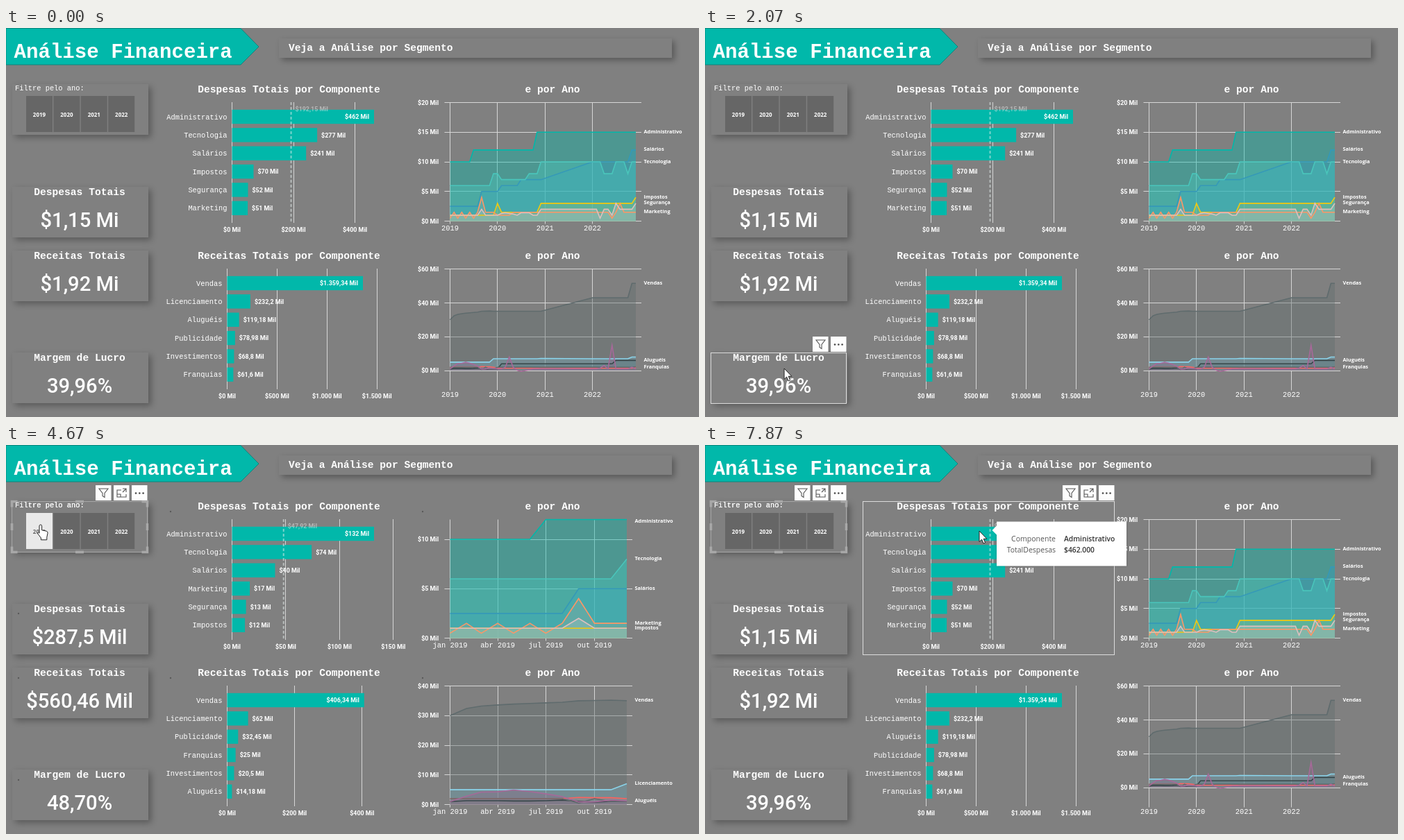
These frames come from a looping animation (998x561 px, 8000 ms). An HTML page with a canvas:

```html
<!DOCTYPE html>
<html lang="pt-BR">
<head>
<meta charset="utf-8">
<title>Análise Financeira</title>
<style>
html, body { margin: 0; width: 100%; height: 100%; overflow: hidden; background: #808080; }
canvas { display: block; width: 998px; height: 561px; }
</style>
</head>
<body>
<canvas id="stage" width="998" height="561"></canvas>
<script>
const ctx = document.getElementById('stage').getContext('2d');
const LOOP = 8000, STEP = 200 / 3;
const TEAL = '#01b8aa', GRAY = '#808080', WHITE = '#fff', GRID = '#d6d6d6';
const MONO = '"Liberation Mono", "Courier New", monospace';
const DIN = 'Roboto, Arial, sans-serif';
const UI = '"Open Sans", "Noto Sans", sans-serif';
const BOLD = 'bold 14.6px ' + MONO, LABEL = '10.4px ' + MONO;
const VALUE = 'bold 8.9px ' + DIN, TAG = 'bold 7.4px ' + UI;

// Monthly values for 2019, 2020 and 2022; "5x3" repeats 5 three times.
const unpack = s => s.split(' ').flatMap(p => {
  const [v, n] = p.split('x');
  return Array(+(n || 1)).fill(+v);
});
const series = rows => rows.map(([name, color, s]) => ({ name, color, data: unpack(s) }));
const expenses = series([
  ['Administrativo', TEAL, '10x6 12x16 15x14'],
  ['Impostos', '#f2c80f', '1x12 3 1.5x10 3x12 4'],
  ['Marketing', '#fe9666', '.5 1.5 .5 1.5 .5 1.5 .5 1.5 4 1.5x3 1x4 1.5x13 .5 1.5 3 1.5x4'],
  ['Salários', '#3599b8', '2.5x8 5x5 6x5 7x6 10x10 12x2'],
  ['Segurança', '#dfbfbf', '1x8 2 1x4 1.3 1.4 1.3 1.2 1 1.4x3 1x2 2x3 .5 2x2 1 3 2x4 3'],
  ['Tecnologia', '#4ac5bb', '6x11 8x2 7x7 8x3 10x4 8x3 10x3 8 10x2']
]);
const revenues = series([
  ['Aluguéis', '#374649', '1 1.3x3 1.2x2 1.3 1.5 1.1 .8 1.1 1.08 1 4x17 6x6'],
  ['Franquias', '#fd625e', '2x8 2.4 2.3x2 2 1.5x11 1.8 1.5x11 1.8'],
  ['Investimentos', '#5f6b6d', '2x8 .5 2 1x2 2x23 2.3'],
  ['Licenciamento', '#8ad4eb', '5x11 7x12 7.2 7x10 8x2'],
  ['Publicidade', '#a66999', '1 2.8 4.2 4.3 4.9 4.4 3.6 2.7 .9x2 1.5 1.246 1x2 2 8 2 .2 -.5 0 .5 1x5 1.5 3 1 15 1x4 2 .83'],
  ['Vendas', '#5f6b6d', '30 32.4 33.2 33.6 33.9 34.1 34.3 34.5 35 35.1 35.2 35.037 35x12 43x10 51.5x2']
]);

// Per view: months shown and [min, max, tick] of both area charts.
const VIEWS = {
  all: { from: 0, to: 36, exp: [0, 20, 5], rev: [-10, 60, 20] },
  2019: { from: 0, to: 12, exp: [0, 12, 5], rev: [0, 40, 10] },
  2020: { from: 12, to: 24, exp: [0, 15, 5], rev: [-10, 40, 20] }
};

const sum = a => a.reduce((p, q) => p + q, 0);
const snap = v => Math.floor(v) + .5;
const num = (v, max = 2, min = 0) =>
  v.toLocaleString('pt-BR', { maximumFractionDigits: max, minimumFractionDigits: min });
const mil = (v, d) => '$' + num(v, d) + ' Mil';
const big = v => v >= 1000 ? '$' + num(v / 1000) + ' Mi' : mil(v);

function text(s, x, y, font, align = 'left', color = WHITE) {
  ctx.font = font;
  ctx.textAlign = align;
  ctx.fillStyle = color;
  ctx.fillText(s, x, y);
}
function rect(x, y, w, h, color) {
  ctx.fillStyle = color;
  ctx.fillRect(x, y, w, h);
}
function line(points, color, width = 1) {
  ctx.beginPath();
  points.forEach(p => ctx.lineTo(...p));
  ctx.strokeStyle = color;
  ctx.lineWidth = width;
  ctx.stroke();
}
function dot(x, y, r, color) {
  ctx.beginPath();
  ctx.arc(x, y, r, 0, 7);
  ctx.fillStyle = color;
  ctx.fill();
}
function panel(x, y, w, h) {
  ctx.save();
  ctx.shadowColor = 'rgba(0,0,0,.3)';
  ctx.shadowBlur = 9;
  ctx.shadowOffsetX = ctx.shadowOffsetY = 4;
  rect(x, y, w, h, GRAY);
  ctx.restore();
}

function banner() {
  const shape = [[0, .5], [338, .5], [364, 27], [338, 53], [0, 53], [0, .5]];
  ctx.beginPath();
  shape.forEach(p => ctx.lineTo(...p));
  ctx.fillStyle = TEAL;
  ctx.fill();
  line(shape, '#0b857c');
  text('Análise Financeira', 11.5, 43, 'bold 29.1px ' + MONO);
  panel(393, 15, 566, 28);
  text('Veja a Análise por Segmento', 407, 33, BOLD);
}

function card(y, title, value) {
  panel(9, y, 196, 73);
  text(title, 106, y + 11.5, BOLD, 'center');
  text(value, 106, y + 58, '500 29.2px ' + DIN, 'center');
}

function slicer(lit) {
  panel(9, 81, 196, 73);
  text('Filtre pelo ano:', 13, 90, LABEL);
  for (let i = 0; i < 4; i++) {
    const x = 29 + i * 39.4, on = lit === i;
    rect(x, 98, 38, 52, on ? '#e9e9e9' : '#666');
    text(2019 + i, x + 19, 127.5, 'bold 8px ' + UI, 'center', on ? '#666' : WHITE);
  }
}

function bars(rows, top, x0, full, tick, digits, title, average) {
  text(title, 407.5, top - 14, BOLD, 'center');
  const list = rows.slice().sort((a, b) => b.total - a.total);
  const k = full / list[0].total, mid = top + 21;
  for (let v = 0; x0 + v * k < 560; v += tick) {
    const x = x0 + v * k;
    line([[snap(x), top], [snap(x), top + 174]], GRID);
    text(mil(v), x, top + 187, VALUE, 'center');
  }
  list.forEach((r, i) => {
    const y = mid + i * 26.35, w = r.total * k;
    rect(x0, y - 10.2, w, 20.4, TEAL);
    text(r.name, x0 - 7, y + 3.7, LABEL, 'right');
    const s = mil(r.total, digits);
    if (i) text(s, x0 + w + 6, y + 3.3, VALUE);
    else text(s, x0 + w - 7, y + 3.3, VALUE, 'right');
  });
  if (average) {
    const v = sum(list.map(r => r.total)) / list.length, x = x0 + v * k;
    ctx.setLineDash([4, 3]);
    line([[x, top], [x, top + 174]], 'rgba(225,235,233,.55)', 2);
    ctx.setLineDash([]);
    text(mil(v), x + 6, top + 13, VALUE, 'left', 'rgba(225,225,225,.55)');
  }
}

function areas(rows, top, [min, max, tick], whole, hoverX) {
  text('e por Ano', 787, top - 14, BOLD, 'center');
  const x0 = 639.5, y0 = top + .5, bottom = y0 + 171;
  const end = whole ? 907 : 894, first = whole ? 2019 : rows.year;
  const day = m => Date.UTC(first, m) - Date.UTC(first, 0);
  const place = m => x0 + (end - x0) * day(m) / day(whole ? 47 : 11);
  // The whole view has no months of 2021, so the line spans them.
  const X = i => place(whole && i > 23 ? i + 12 : i);
  const Y = v => bottom - (v - min) / (max - min) * 171;
  for (let v = 0; v <= max; v += tick) {
    const y = snap(Y(v));
    line([[x0 - 8, y], [end + 8, y]], GRID);
    text(mil(v), 623, Y(v) + 3.2, VALUE, 'right');
  }
  const names = whole ? ['2019', '2020', '2021', '2022'] : ['jan ', 'abr ', 'jul ', 'out '].map(m => m + first);
  names.forEach((s, i) => {
    const x = place(i * (whole ? 12 : 3));
    line([[snap(x), y0], [snap(x), bottom + 4]], GRID);
    text(s, x, top + 185, LABEL, 'center');
  });
  const lines = rows.map(r => r.part.map((v, i) => [X(i), Y(v)]));
  rows.forEach((r, n) => {
    ctx.beginPath();
    [[x0, Y(0)], ...lines[n], [end, Y(0)]].forEach(p => ctx.lineTo(...p));
    ctx.globalAlpha = .4;
    ctx.fillStyle = r.color;
    ctx.fill();
    ctx.globalAlpha = 1;
  });
  rows.forEach((r, n) => line(lines[n], r.color, 1.6));
  const used = [];
  rows.forEach((r, n) => {
    const y = Math.max(lines[n].at(-1)[1] - 1.2, top + 2.5);
    if (used.some(u => Math.abs(u - y) < 7)) return;
    used.push(y);
    text(r.name, end + 11.5, y + 2.7, TAG);
  });
  if (hoverX > x0 && hoverX < end) {
    const gap = i => Math.abs(X(i) - hoverX);
    const near = rows[0].part.reduce((best, v, i) => gap(i) < gap(best) ? i : best, 0);
    line([[X(near), y0], [X(near), bottom]], '#5f6b6d');
    rows.forEach((r, n) => dot(...lines[n][near], 3, r.color));
  }
}

const ICONS = {
  filter: 'M5 5h13l-5 6.5v6l-3-2v-4z',
  focus: 'M11 7H5v10h13v-4M13 5h5v5M18 5l-5 5M5 13h5v4',
  up: 'M11.5 18V5M5.5 11l6-6 6 6',
  down: 'M11.5 4v13M5.5 11l6 6 6-6',
  pair: 'M7.5 5v12M4.5 14l3 3 3-3M15 5v12M12 14l3 3 3-3',
  fork: 'M11.5 5v6M6 17v-6h11v6M4 15l2 2 2-2M15 15l2 2 2-2'
};
function icon(name, x, y) {
  rect(x, y, 22.5, 22, '#fdfdfd');
  if (name === 'more') {
    for (let i = 0; i < 3; i++) dot(x + 6 + i * 5.3, y + 11.5, 1.3, '#444');
    return;
  }
  ctx.save();
  ctx.translate(x, y);
  ctx.strokeStyle = name === 'pair' || name === 'fork' ? '#aaa' : '#555';
  ctx.lineWidth = 1.1;
  ctx.stroke(new Path2D(ICONS[name]));
  ctx.restore();
}

const region = (x, y, w, h, kind) => ({ x, y, w, h, kind });
const SLICER = region(8.5, 81.5, 195, 73, 'chart');
const REV_AREA = region(589.5, 321.5, 394, 221, 'drill');
const REGIONS = [
  SLICER, REV_AREA,
  region(227.5, 81.5, 362, 221, 'chart'),
  region(589.5, 81.5, 394, 221, 'drill'),
  region(227.5, 321.5, 362, 221, 'chart'),
  region(8.5, 229.5, 195, 73, 'card'),
  region(8.5, 321.5, 195, 73, 'card'),
  region(8.5, 468.5, 195, 73, 'card')
];
function frameOf(r, color = '#dcdcdc') {
  ctx.strokeStyle = color;
  ctx.lineWidth = 1;
  ctx.strokeRect(r.x, r.y, r.w, r.h);
  const right = r.x + r.w - 22.5, y = r.y - 23.5;
  const names = r.kind === 'card' ? ['more', 'filter'] : ['more', 'focus', 'filter'];
  names.forEach((n, i) => icon(n, right - i * 26, y));
  if (r.kind === 'drill')
    ['fork', 'pair', 'down', 'up'].forEach((n, i) => icon(n, right - 85 - i * 26.3, y));
}
function handles({ x, y, w, h }) {
  const c = '#a8a8a8';
  for (const px of [x, x + w]) {
    for (const py of [y, y + h]) {
      const sx = px > x ? -1 : 1, sy = py > y ? -1 : 1;
      line([[px + 8 * sx, py], [px, py], [px, py + 8 * sy]], c, 3.5);
    }
    line([[px, y + h / 2 - 5], [px, y + h / 2 + 5]], c, 3.5);
  }
  for (const py of [y, y + h]) line([[x + w / 2 - 6, py], [x + w / 2 + 6, py]], c, 3.5);
}

// Pointer path: time, x, y
const PATH = [
  [333, 992, 548], [400, 860, 470], [533, 520, 260], [600, 420, 190], [733, 560, 180],
  [867, 740, 190], [1000, 690, 390], [1067, 651, 425], [1133, 420, 441], [1200, 222, 447],
  [1333, 188, 452], [1467, 188, 452], [1733, 150, 478], [2067, 114, 491], [2133, 110, 360],
  [2200, 104, 270], [2267, 98, 222], [2333, 92, 212], [2533, 70, 140], [2800, 50, 115],
  [5067, 50, 115], [5133, 62, 116], [5267, 101, 119], [7000, 101, 119], [7467, 395, 124]
];
function pointer(t) {
  if (t < 330) return null;
  const i = PATH.findIndex(k => k[0] > t);
  if (i < 0) return PATH.at(-1).slice(1);
  if (!i) return PATH[0].slice(1);
  const [ta, xa, ya] = PATH[i - 1], [tb, xb, yb] = PATH[i], f = (t - ta) / (tb - ta);
  return [xa + (xb - xa) * f, ya + (yb - ya) * f];
}
const inside = (p, r) => p && p[0] >= r.x && p[0] < r.x + r.w && p[1] >= r.y && p[1] < r.y + r.h;
function tileAt(p) {
  if (!p || p[1] < 98 || p[1] > 150) return -1;
  const i = Math.floor((p[0] - 29) / 39.4);
  return i >= 0 && i < 4 ? i : -1;
}

const ARROW = new Path2D('M0 0V15.5L3.6 12.2 6 18 8.6 16.9 6.2 11.3H10.8z');
const HAND = new Path2D('M-2 1.8a1.8 1.8 0 0 1 3.6 0v6l6.6 1.4q2.2.6 1.8 3l-1.2 6v3.6H.4v-2.8l-4.6-6q-1-1.9.6-2.2l1.6 1.4z');
function cursor([x, y], hand) {
  ctx.save();
  ctx.translate(x, y);
  ctx.fillStyle = WHITE;
  ctx.strokeStyle = '#222';
  ctx.lineWidth = 1;
  ctx.lineJoin = 'round';
  ctx.fill(hand ? HAND : ARROW);
  ctx.stroke(hand ? HAND : ARROW);
  ctx.restore();
}

function tooltip() {
  ctx.save();
  ctx.shadowColor = 'rgba(0,0,0,.25)';
  ctx.shadowBlur = 3;
  rect(420, 110.5, 187, 64, WHITE);
  ctx.restore();
  ctx.beginPath();
  [[420.5, 116], [413.5, 123], [420.5, 130]].forEach(p => ctx.lineTo(...p));
  ctx.fillStyle = WHITE;
  ctx.fill();
  [['Componente', 'Administrativo'], ['TotalDespesas', '$462.000']].forEach(([a, b], i) => {
    const y = 138.5 + i * 16.5;
    text(a, 505, y, '10.5px ' + UI, 'right', '#555');
    text(b, 517, y, '600 10.3px ' + UI, 'left', '#333');
  });
}

const CLICKS = [[3660, 3790], [4660, 4860], [5795, 5925], [6925, 7060]];
const between = (t, a, b) => t >= a && t < b;

function draw(now) {
  const t = Math.floor((now % LOOP + 5) / STEP) * STEP;
  const key = between(t, 3790, 4860) ? 2019 : between(t, 5925, 7060) ? 2020 : 'all';
  const view = VIEWS[key], whole = key === 'all';
  const cut = rows => Object.assign(rows.map(r => {
    const part = r.data.slice(view.from, view.to);
    return { ...r, part, total: sum(part) };
  }), { year: key });
  const exp = cut(expenses), rev = cut(revenues);
  const spent = sum(exp.map(r => r.total)), earned = sum(rev.map(r => r.total));
  const pos = pointer(t), seen = pointer(t - STEP);
  const hover = REGIONS.find(r => inside(seen, r));
  const focused = t >= 3660, tile = tileAt(pos);
  const chosen = between(t, 3660, 4660) ? 0 : between(t, 5795, 6925) ? 1 : -1;

  rect(0, 0, 998, 561, GRAY);
  banner();
  slicer(chosen >= 0 ? chosen : tile);
  card(229, 'Despesas Totais', big(spent));
  card(321, 'Receitas Totais', big(earned));
  card(468, 'Margem de Lucro', num((earned - spent) / earned * 100, 2, 2) + '%');
  bars(exp, 107, 325.5, 204.5, whole ? 200 : 50, 0, 'Despesas Totais por Componente', true);
  bars(rev, 347, 318.5, whole ? 195.5 : 197.3, whole ? 500 : 200, 2, 'Receitas Totais por Componente');
  areas(exp, 107, view.exp, whole);
  areas(rev, 347, view.rev, whole, hover === REV_AREA ? seen[0] : 0);

  if (CLICKS.some(c => between(t, ...c)))
    [[237, 96], [600, 96], [237, 336], [600, 336], [18, 243], [18, 336], [18, 483]]
      .forEach(p => dot(...p, 1.2, '#5a5a5a'));
  if (focused) {
    frameOf(SLICER, '#a8a8a8');
    handles(SLICER);
    text('Filtre pelo ano:', 13, 90, LABEL);
  }
  if (hover && !(focused && hover === SLICER)) frameOf(hover);
  if (t >= 7860) tooltip();
  if (pos) cursor(pos, tile >= 0);
}

const start = performance.now();
function tick() {
  draw(performance.now() - start);
  requestAnimationFrame(tick);
}
tick();
</script>
</body>
</html>
```
